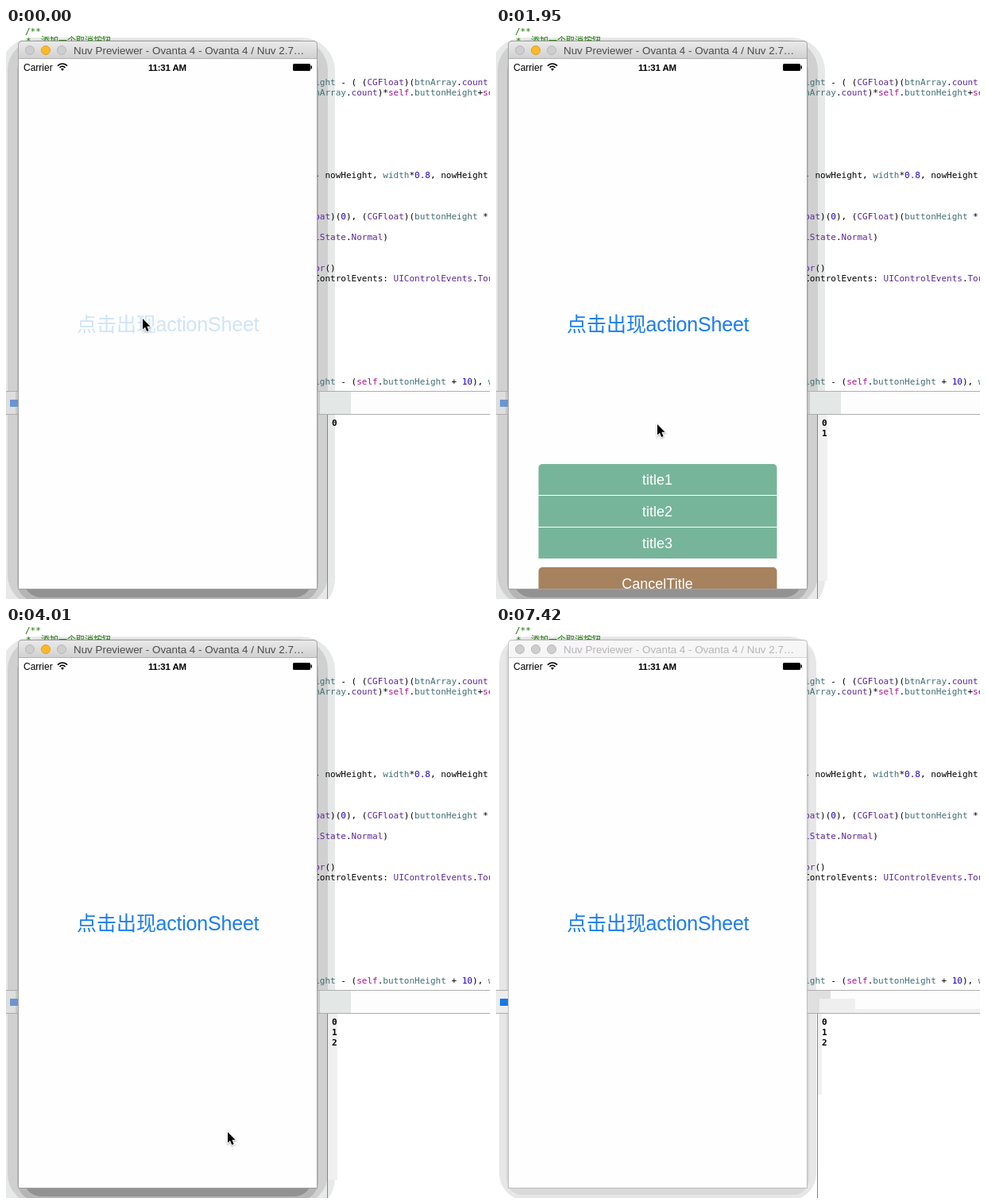
Recreate the animation shown at these times as an HTML page with a canvas. Size 609 by 719 pixels, loop 7590 ms.

```html
<!DOCTYPE html>
<html>
<head>
<meta charset="utf-8">
<style>
html, body { margin: 0; width: 100%; height: 100%; overflow: hidden; background: #fff; }
canvas { display: block; }
</style>
</head>
<body>
<canvas id="stage" width="609" height="719"></canvas>
<script>
const ctx = document.getElementById('stage').getContext('2d');
const LOOP = 7590, STEP = 148, LAST = 50; // the picture advances in steps of STEP ms
const DEACTIVATE = 35;
const MONO = '11px "DejaVu Sans Mono", monospace';
const SANS = '"Liberation Sans", Arial, sans-serif';
const CJK = '"Noto Sans CJK SC", "Noto Sans CJK", sans-serif';
const INK = { k: '#000', p: '#5c2699', t: '#3f6e74', m: '#aa0d91', n: '#1c00cf' };

// Code lines: centre y, then alternating ink key and text
const CODE = [
  [68, 't', 'ight', 'k', ' - ( (', 'p', 'CGFloat', 'k', ')(', 't', 'btnArray', 'k', '.', 'p', 'count'],
  [81, 't', 'nArray', 'k', '.', 'p', 'count', 'k', ')*', 'm', 'self', 'k', '.', 't', 'buttonHeight', 'k', '+', 'm', 'self'],
  [185, 'k', '- nowHeight, ', 't', 'width', 'k', '*', 'n', '0.8', 'k', ', nowHeight'],
  [237, 'p', 'oat', 'k', ')(', 'n', '0', 'k', '), (', 'p', 'CGFloat', 'k', ')(', 't', 'buttonHeight', 'k', ' *'],
  [263, 'p', 'lState', 'k', '.', 'p', 'Normal', 'k', ')'],
  [302, 'p', 'or', 'k', '()'],
  [315, 'k', 'ControlEvents: ', 'p', 'UIControlEvents', 'k', '.', 'p', 'Touch'],
  [445, 't', 'ight', 'k', ' - (', 'm', 'self', 'k', '.', 't', 'buttonHeight', 'k', ' + ', 'n', '10', 'k', '), ', 't', 'width']
];

// Pointer path: step, x, y
const POINTER = [
  [0, 171, 365], [1, 171, 365], [4, 205, 585], [6, 205, 587], [9, 206, 400],
  [10, 204, 370], [11, 204, 370], [15, 200, 625], [16, 200, 625], [17, 198, 539],
  [19, 198, 370], [20, 198, 370], [23, 229, 659], [25, 229, 659], [31, 417, 568],
  [34, 417, 568], [39, 442, 551], [41, 442, 551], [44, 440, 570], [46, 433, 590], [51, 433, 590]
];

// Sheet travel: start and end step, hidden drop at each end
const DROP = 178;
const SHEET = [
  [1, 3.5, DROP, 0], [5.15, 7.65, 0, DROP], [11, 13.5, DROP, 0], [17, 17, 0, DROP],
  [20, 22.5, DROP, 0], [23.15, 25.65, 0, DROP]
];
const PRESSES = [0, 10, 19];

const smooth = p => p * p * (3 - 2 * p);

function rect(x, y, w, h, color) {
  ctx.fillStyle = color;
  ctx.fillRect(x, y, w, h);
}

function round(x, y, w, h, r, color) {
  ctx.fillStyle = color;
  ctx.beginPath();
  ctx.roundRect(x, y, w, h, r);
  ctx.fill();
}

function text(str, x, y, font, color, align = 'left', spacing = 0) {
  ctx.font = font;
  ctx.fillStyle = color;
  ctx.textAlign = align;
  ctx.letterSpacing = spacing + 'px';
  ctx.fillText(str, x, y);
}

function pointerAt(s) {
  const i = POINTER.findIndex(k => k[0] > s);
  const [a, x0, y0] = POINTER[i - 1], [b, x1, y1] = POINTER[i];
  const p = smooth((s - a) / (b - a));
  return [Math.round(x0 + (x1 - x0) * p), Math.round(y0 + (y1 - y0) * p)];
}

function sheetDrop(s) {
  let drop = DROP;
  for (const [a, b, from, to] of SHEET) {
    if (s < a) break;
    drop = s >= b ? to : from + (to - from) * smooth((s - a) / (b - a));
  }
  return Math.round(drop);
}

function drawShadow(active) {
  if (active) {
    round(-7, 12, 421, 724, 42, '#e7e9e8');
    round(2, 15, 403, 712, 38, '#d0d0d0');
    round(14, 30, 379, 692, 24, '#b5b5b5');
    round(22, 30, 363, 687, 22, '#929292');
  } else {
    round(4, 12, 399, 710, 34, '#e7e7e7');
    round(13, 15, 381, 700, 20, '#d9d9d9');
  }
}

function drawEditor(s, active) {
  text('/**', 24, 8, MONO, '#177500');
  text('*', 25, 20, MONO, '#177500');
  text('添加一个取消按钮', 44, 20, '11px ' + CJK, '#177500');
  for (const [y, ...parts] of CODE) {
    let x = 388.2;
    for (let i = 0; i < parts.length; i += 2) {
      text(parts[i + 1], x, y + 4, MONO, INK[parts[i]]);
      x += ctx.measureText(parts[i + 1]).width;
    }
  }

  // Divider bar
  rect(0, 457, 609, 30, '#fdfdfd');
  rect(0, 458, 16, 28, active ? '#dedede' : '#ececec');
  if (active) {
    rect(391, 458, 43, 28, '#e3e7e6');
    rect(391, 458, 4, 28, '#c8c8c8');
    rect(12, 458, 4, 28, '#c8c8c8');
  } else {
    rect(391, 458, 30, 28, '#dfdfdf');
    rect(407, 468, 45, 18, '#efefef');
    if (s >= 42) rect(452, 481, 157, 5, '#f1f1f1');
  }
  rect(0, 457, 609, 1, '#adadad');
  rect(0, 486, 609, 1, '#adadad');
  rect(5, 468, 11, 9, active ? '#6b95d1' : '#1579e8');

  // Console
  if (!active) rect(405, 487, 5, 102, '#f1f1f1');
  else if (s >= 5) rect(405, 487, 12, 209, '#f0f0f0');
  rect(404, 487, 1, 232, '#858585');
  const count = s >= 17 ? 3 : s >= 5 ? 2 : 1;
  for (let i = 0; i < count; i++) text(i, 410, 501 + 13 * i, 'bold ' + MONO, '#000');
  const caret = s >= DEACTIVATE && s < 43 || s >= 46 && s < LAST;
  if (caret) rect(410, 530, 1, 13, '#000');
}

function drawStatus() {
  text('Carrier', 22, 54, '12px ' + SANS, '#000');
  text('11:31 AM', 203, 54, 'bold 11.5px ' + SANS, '#000', 'center', -0.25);
  ctx.strokeStyle = '#000';
  ctx.lineWidth = 1.7;
  for (const r of [4.6, 8]) {
    ctx.beginPath();
    ctx.arc(71, 53, r, -Math.PI * 0.77, -Math.PI * 0.23);
    ctx.stroke();
  }
  ctx.fillStyle = '#000';
  ctx.beginPath();
  ctx.moveTo(71, 54);
  ctx.arc(71, 53.5, 2.5, -Math.PI * 0.77, -Math.PI * 0.23);
  ctx.fill();
  round(361, 45, 22, 9, 1.5, '#000');
  rect(383.5, 47.5, 1.5, 4, '#000');
}

function drawSheet(drop) {
  if (drop >= DROP) return;
  ctx.save();
  ctx.beginPath();
  ctx.rect(16, 39, 375, 667);
  ctx.clip();
  ctx.translate(0, drop);
  const font = '18px ' + SANS;
  for (let i = 0; i < 3; i++) {
    round(53.5, 530 + 40 * i, 300, 39, i ? 0 : [5, 5, 0, 0], '#77b59b');
    text('title' + (i + 1), 203, 556 + 40 * i, font, '#fff', 'center');
  }
  round(53.5, 660, 300, 40, 5, '#a6825f');
  text('CancelTitle', 203, 687, font, '#fff', 'center');
  ctx.restore();
}

function drawWindow(s, active) {
  const bar = ctx.createLinearGradient(0, 16, 0, 38);
  bar.addColorStop(0, active ? '#ebebeb' : '#f7f7f7');
  bar.addColorStop(1, active ? '#d1d1d1' : '#f5f5f5');
  round(15, 16, 377, 691, [5, 5, 0, 0], active ? '#a2a2a2' : '#bdbdbd');
  round(16, 17, 375, 22, [4, 4, 0, 0], bar);
  rect(16, 38, 375, 1, active ? '#b1b1b1' : '#d2d2d2');
  rect(16, 39, 375, 667, '#fefefe');
  [30, 50, 70].forEach((x, i) => {
    const lit = active && i === 1;
    ctx.beginPath();
    ctx.arc(x, 28, 5.5, 0, Math.PI * 2);
    ctx.fillStyle = lit ? '#fcb827' : '#cecece';
    ctx.strokeStyle = lit ? '#dfa023' : '#b8b8b8';
    ctx.lineWidth = 1;
    ctx.fill();
    ctx.stroke();
  });
  text('Nuv Previewer - Ovanta 4 - Ovanta 4 / Nuv 2.7…', 85, 33, '13.4px ' + SANS, active ? '#4b4b4b' : '#b7b3b8');
  drawStatus();
  const ink = PRESSES.includes(s) ? '#cfe3fb' : '#1a7cf0';
  text('点击出现', 89, 382, '300 25px ' + CJK, ink);
  text('actionSheet', 188.5, 382, '25px ' + SANS, ink, 'left', -0.2);
  drawSheet(sheetDrop(s));
}

function drawPointer(s) {
  if (s >= 48) return;
  const [x, y] = pointerAt(s);
  ctx.save();
  ctx.translate(x, y);
  if (s >= DEACTIVATE) {
    rect(0, -6, 1, 13, '#000');
    rect(-2, 1, 5, 1, '#000');
    for (const side of [-1, 1]) {
      rect(side < 0 ? -3 : 1, -8, 3, 1, '#000');
      rect(side < 0 ? -3 : 1, 7, 3, 1, '#000');
    }
    rect(-1, -7, 3, 1, '#000');
    rect(-1, 6, 3, 1, '#000');
  } else {
    const arrow = new Path2D('M1 1V14.5L4 11.7L6.2 17L8.6 16L6.4 10.8H10.6Z');
    ctx.shadowColor = 'rgba(0,0,0,.35)';
    ctx.shadowBlur = 2;
    ctx.shadowOffsetY = 1;
    ctx.strokeStyle = '#fff';
    ctx.lineWidth = 2;
    ctx.stroke(arrow);
    ctx.shadowColor = 'transparent';
    ctx.fillStyle = '#000';
    ctx.fill(arrow);
  }
  ctx.restore();
}

function draw(now) {
  const s = Math.min(LAST, Math.floor((now - start) % LOOP / STEP));
  const active = s < DEACTIVATE;
  rect(0, 0, 609, 719, '#fff');
  drawShadow(active);
  drawEditor(s, active);
  drawWindow(s, active);
  drawPointer(s);
}

function tick() {
  draw(performance.now());
  requestAnimationFrame(tick);
}

const start = performance.now();
tick();
</script>
</body>
</html>
```
